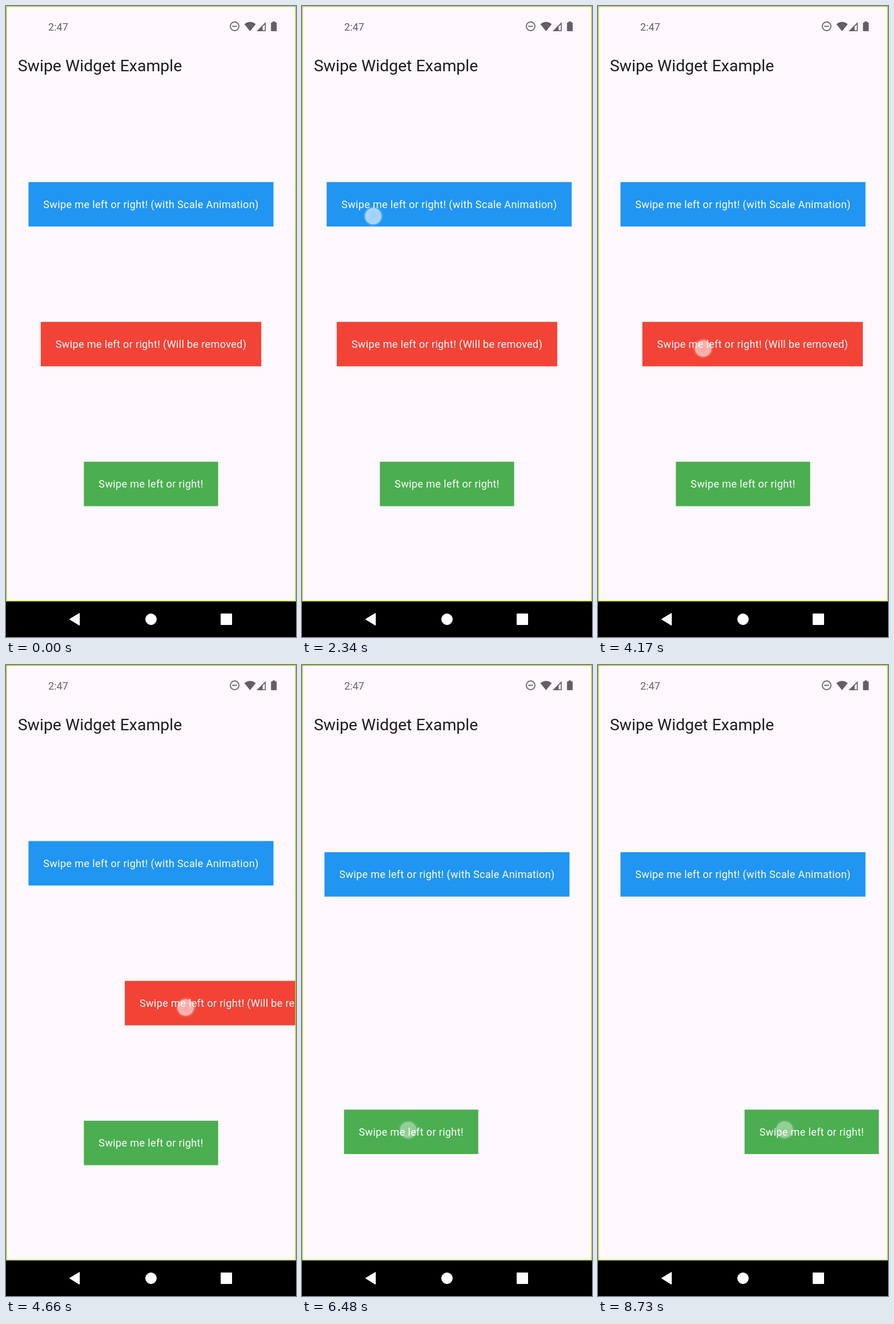
Write an HTML page that moves like this. It is 508 px wide and 1102 px high and loops after 8.8 s.

```html
<!DOCTYPE html>
<html lang="en">
<head>
<meta charset="utf-8">
<title>Swipe Widget Example</title>
<style>
  html, body { margin: 0; width: 100%; height: 100%; overflow: hidden; background: #fdf7fe; }
  svg { display: block; width: 508px; height: 1102px; }
  text { font-family: Roboto, sans-serif; }
  .label { font-size: 18.11px; letter-spacing: .323px; fill: #fff; text-anchor: middle; }
  .status { fill: #645f67; }
</style>
</head>
<body>
<svg viewBox="0 0 508 1102" xmlns="http://www.w3.org/2000/svg">
  <defs>
    <radialGradient id="dot">
      <stop offset="0" stop-color="#fff" stop-opacity=".9"/>
      <stop offset=".7" stop-color="#fff"/>
      <stop offset=".76" stop-color="#fff" stop-opacity=".95"/>
      <stop offset=".8" stop-color="#fff" stop-opacity=".32"/>
      <stop offset="1" stop-color="#fff" stop-opacity="0"/>
    </radialGradient>
  </defs>
  <rect width="508" height="1102" fill="#fdf7fe"/>

  <g class="status">
    <text x="74" y="42.6" font-size="18.11">2:47</text>
    <circle cx="400.5" cy="35.5" r="7.6" fill="none" stroke="#645f67" stroke-width="1.7"/>
    <path d="M396.3 34.6h8.4v1.8h-8.4z"/>
    <path d="M427.5 44 417.5 31.8Q427.5 23.6 437.5 31.8Z"/>
    <path fill-rule="evenodd" d="M439 44 455 28V44ZM449.5 36.2V42.4H453.4V32.2Z"/>
    <path d="M467 27h4.5v1.8h1.7q1 0 1 1v13.2q0 1-1 1h-8q-1 0-1-1V29.8q0-1 1-1h1.8z"/>
  </g>
  <text x="20.7" y="113.5" font-size="28.46" fill="#1d1b20">Swipe Widget Example</text>

  <g id="boxes"></g>
  <circle id="touch" r="18.5" fill="url(#dot)"/>

  <rect x=".75" y=".75" width="506.5" height="1038.5" fill="none" stroke="#afd136" stroke-width="1.5"/>
  <rect y="1040" width="508" height="62"/>
  <g fill="#fff" stroke="#fff" stroke-linejoin="round">
    <path d="M112 1071 128.5 1061V1081Z" stroke-width="1.5"/>
    <circle cx="254" cy="1071" r="9.5" stroke-width="1"/>
    <rect x="377" y="1062" width="18" height="18" stroke-width="2"/>
  </g>
</svg>
<script>
const LOOP = 8800, SLOP = 24, BOX_H = 77.6, TOP = 140.9, BODY = 899.2, MID = 254;

const boxes = [
  { text: 'Swipe me left or right! (with Scale Animation)', w: 429.2, color: '#2095f2' },
  { text: 'Swipe me left or right! (Will be removed)', w: 386.2, color: '#f34236' },
  { text: 'Swipe me left or right!', w: 235.2, color: '#4bae50' }
];

// down/up: finger contact; move..end: drag from x0 to x1; back: settle time
const swipes = [
  { box: 0, down: 520, move: 830, end: 1330, up: 1340, back: 330, x0: 293, x1: 122, y: 346, alpha: .6 },
  { box: 0, down: 2130, move: 2130, end: 2960, up: 3000, back: 320, x0: 97, x1: 281, y: 367, alpha: .62 },
  { box: 1, down: 3900, move: 3910, end: 4720, up: 4730, back: 200, x0: 143.5, x1: 317, y: 598, alpha: .6, fly: 452 },
  { box: 2, down: 6000, move: 6170, end: 6760, up: 6770, back: 330, x0: 273, x1: 113, y: 812, alpha: .42 },
  { box: 2, down: 7960, move: 8130, end: 8850, up: 8860, back: 330, x0: 182.5, x1: 337, y: 811.5, alpha: .42 }
];
const COLLAPSE = [5020, 5220];

const ns = 'http://www.w3.org/2000/svg';
const touch = document.getElementById('touch');

function add(parent, tag, attrs) {
  const el = document.createElementNS(ns, tag);
  for (const k in attrs) el.setAttribute(k, attrs[k]);
  return parent.appendChild(el);
}

for (const b of boxes) {
  b.el = add(document.getElementById('boxes'), 'g', {});
  add(b.el, 'rect', { x: -b.w / 2, y: -BOX_H / 2, width: b.w, height: BOX_H, fill: b.color });
  add(b.el, 'text', { class: 'label', y: 6.2 }).textContent = b.text;
}

const span = (t, a, b) => Math.min(1, Math.max(0, (t - a) / (b - a)));
const easeInOut = p => (1 - Math.cos(Math.PI * p)) / 2;
const easeOut = p => 1 - (1 - p) ** 2;

const fingerX = (s, t) => s.x0 + (s.x1 - s.x0) * easeInOut(span(t, s.move, s.end));

function offsetOf(s, t) {
  const d = fingerX(s, t) - s.x0;
  const drag = Math.sign(d) * Math.max(0, Math.abs(d) - SLOP);
  const rest = s.fly || 0;
  return drag + (rest - drag) * easeOut(span(t, s.up, s.up + s.back));
}

function draw(t) {
  const offsets = [0, 0, 0];
  let alpha = 0;
  for (const s of swipes) {
    if (t < s.down) continue;
    offsets[s.box] = offsetOf(s, t);
    alpha = s.alpha * span(t, s.down - 10, s.down + 10) * (1 - span(t, s.up, s.up + 75));
    touch.setAttribute('cx', fingerX(s, t));
    touch.setAttribute('cy', s.y);
  }
  touch.setAttribute('opacity', alpha);

  // evenly spaced column; the middle item shrinks to nothing once dismissed
  const midH = BOX_H * (1 - easeInOut(span(t, ...COLLAPSE)));
  const heights = [BOX_H, midH, BOX_H];
  const gap = (BODY - 2 * BOX_H - midH) / 4;
  let y = TOP;
  boxes.forEach((b, i) => {
    y += gap;
    const o = offsets[i];
    const scale = i ? 1 : 1 + .1 * (Math.abs(o) / 160) ** 2.3;
    b.el.setAttribute('transform', `translate(${MID + o} ${y + heights[i] / 2}) scale(${scale})`);
    y += heights[i];
  });
  boxes[1].el.setAttribute('visibility', t > COLLAPSE[0] ? 'hidden' : 'visible');
}

const start = performance.now();
function tick() {
  draw((performance.now() - start) % LOOP);
  requestAnimationFrame(tick);
}
tick();
</script>
</body>
</html>
```
